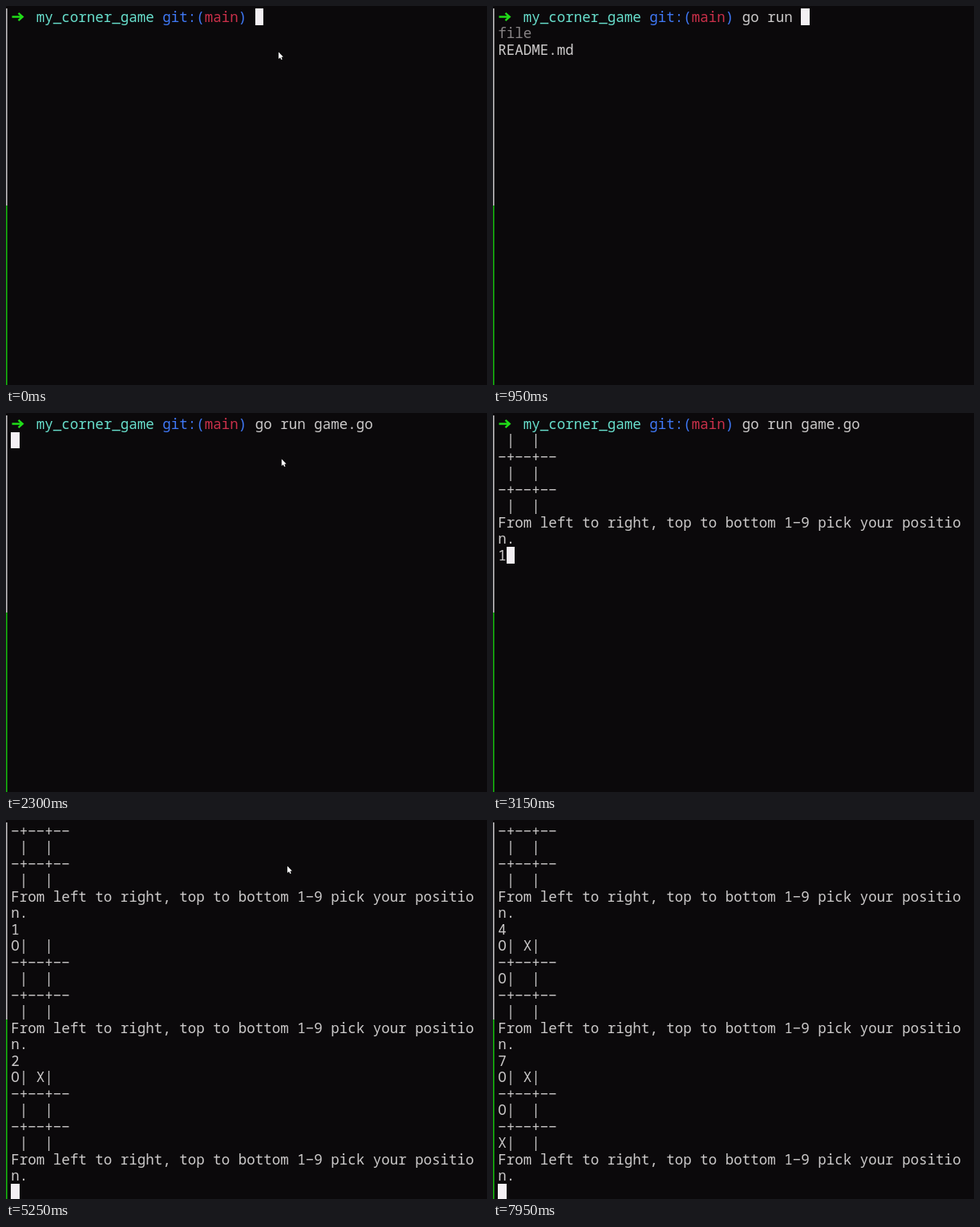
An HTML page that plays this animation: 600 px wide and 473 px high, repeating every 8000 ms.

```html
<!DOCTYPE html>
<html lang="en">
<head>
<meta charset="utf-8">
<title>Terminal game</title>
<style>
  html, body { margin: 0; width: 100%; height: 100%; overflow: hidden; background: #0b090b; }
  svg { display: block; width: 600px; height: 473px; }
  text { font: 17.5px "Noto Sans Mono", "DejaVu Sans Mono", monospace; fill: #cccaca; white-space: pre; }
</style>
</head>
<body>
<svg viewBox="0 0 600 473">
  <rect width="600" height="473" fill="#0b090b"/>
  <rect y="3" width="1.6" height="246" fill="#bcbabc"/>
  <rect y="249" width="1.6" height="224" fill="#16b40e"/>
  <g id="prompt">
    <path d="M7.5 13.5H20.5M15.5 8.8L20.7 13.5L15.5 18.2" fill="none" stroke="#20dc18" stroke-width="2.4"/>
  </g>
  <g id="rows"></g>
  <rect id="caret" width="10.5" height="20.5" fill="#f3eff3" shape-rendering="crispEdges"/>
  <path id="mouse" d="M0 0V8.6L2 6.8L3.3 9.7L4.7 9.1L3.4 6.3L5.8 6.1Z" fill="#fff"/>
</svg>
<script>
const NS = 'http://www.w3.org/2000/svg';
const LOOP = 8000, COLS = 55, ROWS = 23, INPUT_COL = 29;
const LEFT = 6.3, TOP = 3.4, CELL = 10.5, LINE = 20.5, BASE = 16.5;
const colX = col => LEFT + col * CELL;
const rowY = row => TOP + row * LINE;
const $ = id => document.getElementById(id);
const prompt = $('prompt'), caret = $('caret'), mouse = $('mouse');

function addText(parent, col, row, str = '', fill = '') {
  const el = document.createElementNS(NS, 'text');
  el.setAttribute('x', colX(col));
  el.setAttribute('y', rowY(row) + BASE);
  el.style.fill = fill;
  el.textContent = str;
  return parent.appendChild(el);
}

addText(prompt, 3, 0, 'my_corner_game', '#68dfcd');
addText(prompt, 18, 0, 'git:(    )', '#3f78f5');
addText(prompt, 23, 0, 'main', '#cb304a');
const hintHead = addText(prompt, 0, 1, 'file', '#878385');
const hintList = addText(prompt, 0, 2);
const rows = Array.from({ length: ROWS }, (_, r) => addText($('rows'), 0, r));

// Everything the terminal receives, as { at, str } in order of time
const output = [];
const print = (at, str) => output.push({ at, str });
const type = (str, start, step) => [...str].forEach((ch, i) => print(start + i * step, ch));

// Board after the given moves; marks alternate between O and X
function turn(moves) {
  const mark = n => moves.includes(n) ? 'OX'[moves.indexOf(n) % 2] : ' ';
  const grid = [1, 4, 7].map(n => `${mark(n)}| ${mark(n + 1)}|`).join('\n−+−−+−−\n');
  const ask = 'From left to right, top to bottom 1−9 pick your position.';
  return `${grid}\n${ask.slice(0, COLS)}\n${ask.slice(COLS)}\n`;
}

type('go run ', 100, 133);
type('game.go', 1350, 115);
print(2200, '\n');
print(2400, turn([]));

const moves = [1, 2, 4, 7], pressed = [3150, 4000, 5850, 7700];
moves.forEach((move, i) => {
  print(pressed[i], String(move));
  print(pressed[i] + 200, '\n' + turn(moves.slice(0, i + 1)));
});

const linesAt = t => output.filter(o => o.at <= t).map(o => o.str).join('').split('\n');

// Completions follow the typed word
function hintFor(lines) {
  if (lines.length > 1) return '';
  if (lines[0].startsWith('go run g')) return 'game.go  go.mod';
  return lines[0].startsWith('go r') ? 'README.md' : '';
}

// The pointer drifts right and hides while a line is being typed
const drift = [[0, 340], [2300, 343.8], [5250, 351], [LOOP, 354]];
function mouseX(t) {
  const i = drift.findIndex(k => k[0] > t);
  const [t0, x0] = drift[i - 1], [t1, x1] = drift[i];
  return x0 + (x1 - x0) * (t - t0) / (t1 - t0);
}
const typing = t => linesAt(t).at(-1) !== '';

function draw(t) {
  const lines = linesAt(t), last = lines.length - 1;
  const scroll = Math.max(0, lines.length - ROWS);
  const startCol = n => n ? 0 : INPUT_COL;
  rows.forEach((el, r) => {
    el.textContent = lines[r + scroll] || '';
    el.setAttribute('x', colX(startCol(r + scroll)));
  });
  prompt.style.display = scroll ? 'none' : '';

  caret.setAttribute('x', colX(startCol(last) + lines[last].length));
  caret.setAttribute('y', rowY(last - scroll));

  const hint = hintFor(lines);
  hintList.textContent = hint;
  hintHead.style.display = hint ? '' : 'none';

  mouse.style.display = typing(t) || typing(t - 100) ? 'none' : '';
  mouse.setAttribute('transform', `translate(${mouseX(t)} 57.4)`);
}

function tick() {
  draw(performance.now() % LOOP);
  requestAnimationFrame(tick);
}
tick();
</script>
</body>
</html>
```
